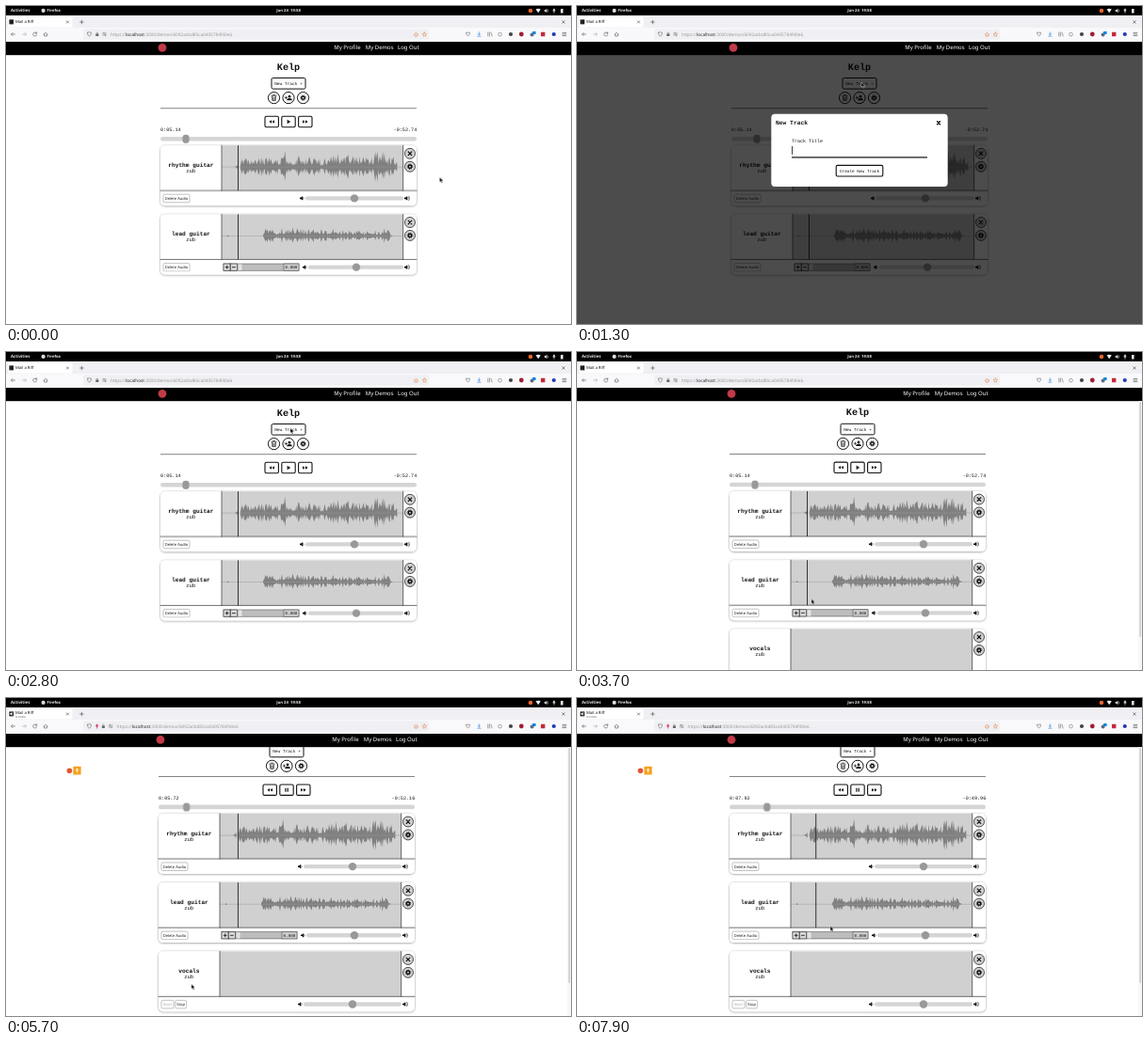
Animation, 600 px wide and 338 px high, one loop 8000 ms. Source, as an HTML page:

```html
<!DOCTYPE html>
<html lang="en">
<head>
<meta charset="utf-8">
<title>Demo page</title>
<style>
html, body { margin: 0; width: 100%; height: 100%; overflow: hidden; background: #fff; }
svg { display: block; width: 100%; height: 100%; }
text { font-family: "Noto Sans", "Open Sans", sans-serif; white-space: pre; text-rendering: geometricPrecision; }
.mono { font-family: "Liberation Mono", "DejaVu Sans Mono", monospace; }
.bold { font-weight: 700; }
.mid { text-anchor: middle; }
.end { text-anchor: end; }
.line { fill: none; stroke: #111; stroke-linecap: round; stroke-linejoin: round; }

.modal, .shift, .added, .idle, .playing, .tab-idle, .capture, .start, .stop, .url {
  animation: 8s step-end infinite;
}
.modal { animation-name: modal; }
.shift { animation-name: shift; }
.added { animation-name: added; }
.idle { animation-name: idle; }
.playing { animation-name: playing; }
.tab-idle { animation-name: tab-idle; }
.capture { animation-name: capture; }
.start { animation-name: start; }
.stop { animation-name: stop; }
.url { animation-name: url; }
.scroll { animation: scroll 8s ease-out infinite; }
.playhead { animation: playhead 8s linear infinite; }
.seek { animation: seek 8s linear infinite; }
.cursor { animation: cursor 8s linear infinite; }

@keyframes modal { 0% { opacity: 0 } 16.25% { opacity: 1 } 35%, 100% { opacity: 0 } }
@keyframes shift { 0% { transform: none } 43.75%, 100% { transform: translateX(-2px) } }
@keyframes added { 0% { opacity: 0 } 43.75%, 100% { opacity: 1 } }
@keyframes idle { 0% { opacity: 1 } 62.5%, 100% { opacity: 0 } }
@keyframes playing { 0% { opacity: 0 } 62.5%, 100% { opacity: 1 } }
@keyframes tab-idle { 0% { opacity: 1 } 65%, 100% { opacity: 0 } }
@keyframes capture { 0% { opacity: 0 } 65%, 100% { opacity: 1 } }
@keyframes start { 0% { fill: #222 } 62.5%, 100% { fill: #aaa } }
@keyframes stop { 0% { fill: #aaa } 62.5%, 100% { fill: #222 } }
@keyframes url { 0% { transform: none } 65%, 100% { transform: translateX(6.5px) } }
@keyframes scroll { 0%, 46.25% { transform: none } 48.75%, 100% { transform: translateY(-25.3px) } }
@keyframes playhead { 0%, 64% { transform: none } 100% { transform: translateX(9.55px) } }
@keyframes seek { 0%, 64% { transform: none } 100% { transform: translateX(13.2px) } }
@keyframes cursor {
  0%, 1.25% { transform: translate(460.5px, 182px); animation-timing-function: ease-in-out }
  10%, 38.75% { transform: translate(302px, 81px) }
  41.25%, 42.5% { transform: translate(283.5px, 195px) }
  46.25%, 51.25% { transform: translate(249px, 262.5px) }
  55% { transform: translate(180px, 341px) }
  56.25% { transform: translate(170px, 341px) }
  57.5% { transform: translate(168px, 334px) }
  60%, 66.25% { transform: translate(172px, 328.5px) }
  72.5% { transform: translate(203px, 298px) }
  81.25% { transform: translate(220px, 279.5px) }
  83.75% { transform: translate(228px, 259px) }
  95%, 100% { transform: translate(269px, 242.5px) }
}
</style>
</head>
<body>
<svg id="stage" viewBox="0 0 600 338">
  <defs>
    <filter id="soft" x="-5%" y="-10%" width="110%" height="120%">
      <feDropShadow dx="0" dy="0.5" stdDeviation="1.2" flood-opacity=".45"/>
    </filter>
  </defs>
</svg>
<script>
const LOOP = 8000, DURATION = 57.885, CARD_STEP = 73.2;
const stage = document.getElementById('stage');

const text = (x, y, size, str, cls = '', fill = '#111') =>
  `<text x="${x}" y="${y}" font-size="${size}" class="${cls}" fill="${fill}">${str}</text>`;
const rect = (x, y, w, h, fill, r = 0, extra = '') =>
  `<rect x="${x}" y="${y}" width="${w}" height="${h}" rx="${r}" fill="${fill}" ${extra}/>`;
const circle = (x, y, r, fill, extra = '') =>
  `<circle cx="${x}" cy="${y}" r="${r}" fill="${fill}" ${extra}/>`;
const path = (d, fill = '#111') => `<path d="${d}" fill="${fill}"/>`;
const line = (d, w = 0.8, color = '#111') =>
  `<path d="${d}" class="line" style="stroke:${color};stroke-width:${w}"/>`;
const group = (cls, ...parts) => `<g class="${cls}">${parts.join('')}</g>`;
const at = (x, y, ...parts) => `<g transform="translate(${x} ${y})">${parts.join('')}</g>`;
const outlined = (x, y, w, h, color = '#111', width = 1) =>
  rect(x, y, w, h, '#fff', 1.5, `stroke="${color}" stroke-width="${width}"`);

const cross = (x, y, s, w = 1.2, color) =>
  line(`M${x - s} ${y - s}l${2 * s} ${2 * s}m0 ${-2 * s}l${-2 * s} ${2 * s}`, w, color);
const gear = (x, y) =>
  circle(x, y, 1.7, 'none', 'stroke="#111" stroke-width="1.5"') +
  circle(x, y, 2.7, 'none', 'stroke="#111" stroke-width=".9" stroke-dasharray="1.06 1.06"');
const speaker = (x, y, loud) =>
  path(`M${x - 2} ${y - .8}h1.3l1.8 -1.6v4.8l-1.8 -1.6h-1.3z`) +
  line(`M${x + 1.8} ${y - 1}q.8 1 0 2` + (loud ? `m1 -3.2q1.8 2.2 0 4.4` : ''), 0.6);

function random(seed) {
  return () => (seed = (seed * 16807) % 2147483647) / 2147483647;
}

// Mirrored waveform: a spiky envelope given by a few [x, amplitude] points.
function wave(envelope, seed) {
  const rnd = random(seed), top = [], bottom = [];
  let k = 0;
  for (let x = envelope[0][0]; x < envelope.at(-1)[0]; x += 0.8) {
    while (envelope[k + 1][0] <= x) k++;
    const [x0, a0] = envelope[k], [x1, a1] = envelope[k + 1];
    const amp = a0 + (a1 - a0) * (x - x0) / (x1 - x0);
    const height = amp * (0.2 + 0.8 * rnd() ** 1.6);
    top.push(`${x.toFixed(2)} ${(-height).toFixed(2)}`);
    bottom.unshift(`${x.toFixed(2)} ${(height * (0.7 + 0.3 * rnd())).toFixed(2)}`);
  }
  return path(`M${top.join('L')}L${bottom.join('L')}Z`, '#808080') + rect(0, -.25, 192, .5, '#999');
}

const rhythm = [[20, 8], [24, 12], [32, 9], [44, 11], [56, 10], [64, 14], [67, 18], [70, 10], [84, 12],
  [100, 11], [108, 9], [116, 16], [122, 16], [128, 10], [134, 17], [140, 11], [148, 14], [156, 10],
  [162, 14], [168, 23], [174, 20], [177, 10], [183, 14], [187, 5]];
const lead = [[44, 7], [48, 9], [60, 7], [64, 10], [68, 7], [76, 9], [95, 7], [108, 8], [125, 8],
  [133, 6], [140, 4], [145, 7], [152, 4], [160, 8], [165, 5], [174, 9], [180, 3], [182, 1]];

const volume = (left, thumb) =>
  speaker(left - 4, 56.2, false) + rect(left, 54, 422 - left, 4.4, '#d5d5d5', 2.2) +
  circle(thumb, 56.2, 4.2, '#999') + speaker(425, 56.2, true);
const smallButton = (x, w, label, cls = '') =>
  outlined(x, 52, w, 8.6, '#999', .6) + text(x + w / 2, 57.8, 4.1, label, 'mid ' + cls, '#222');

function card(index, title, { shape = '', left = 318, thumb = 370, footer }) {
  const roundButton = (y, icon) =>
    circle(429, y, 5.5, '#d3d3d3', 'stroke="#222" stroke-width=".8"') + icon;
  return at(0, 148.2 + index * CARD_STEP,
    rect(164, 0, 272, 64, '#fff', 5, 'filter="url(#soft)"'),
    rect(229, 0, 193, 48, '#d0d0d0'),
    shape && at(229, 23, shape),
    line('M229 0v48M421.7 0v48M164 48h272', .7, '#333'),
    shape && group('playhead', rect(246, 0, .9, 48, '#222')),
    text(196.4, 23, 6.2, title, 'mono bold mid'),
    text(196.2, 28.7, 5.6, 'zub', 'mono mid'),
    roundButton(8.6, cross(429, 8.6, 1.8)),
    roundButton(22.5, gear(429, 22.5)),
    footer, volume(left, thumb));
}

const nudge =
  rect(231, 52.6, 80, 7.2, '#bdbdbd', 0, 'stroke="#555" stroke-width=".6"') +
  rect(231, 52.6, 14.6, 7.2, '#d8d8d8', 0, 'stroke="#333" stroke-width=".6"') +
  line('M238.2 52.6v7.2M233.2 56.2h3M234.7 54.7v3M240.4 56.2h3', .8) +
  rect(247, 53, 3.5, 6.4, '#e4e4e4') + rect(295, 52.6, 16, 7.2, '#ccc', 0, 'stroke="#555" stroke-width=".6"') +
  text(303, 57.8, 4.3, '0.000', 'mono mid');

const roundTool = (x, icon) =>
  circle(x, 97.6, 6.1, '#fff', 'stroke="#111" stroke-width="1"') + icon;
const transport = (x, ...icons) => outlined(x - 7.2, 117.3, 14.4, 11.4, '#111', 1.1) + icons.join('');

const content = group('shift', group('scroll',
  text(300, 67.5, 10.2, 'Kelp', 'mono bold mid'),
  outlined(282, 76.5, 36, 11.6),
  text(300, 83.8, 4.5, 'New Track +', 'mono mid'),
  roundTool(284.5, line('M282 95.3h5M283.6 94.4h1.8M282.5 96.2l.3 4.4h3.4l.3 -4.4M283.8 97v2.6M285.2 97v2.6', .7)),
  roundTool(300, circle(301, 96.2, 1.4, '#111') + path('M298.2 100.2q0 -2.2 2.8 -2.2t2.8 2.2z') +
    line('M296.2 97.4h2.4M297.4 96.2v2.4', .7)),
  roundTool(315.5, gear(315.5, 97.6)),
  rect(164, 108.3, 272, .9, '#777'),
  transport(282.2, path('M282 121.2v3.6l-2.6 -1.8zM285 121.2v3.6l-2.6 -1.8z')),
  transport(300, group('idle', path('M298.6 120.8v4.4l3.6 -2.2z')),
    group('playing', rect(298.3, 121, 1.2, 4, '#111'), rect(300.6, 121, 1.2, 4, '#111'))),
  transport(317.8, path('M315 121.2v3.6l2.6 -1.8zM318 121.2v3.6l2.6 -1.8z')),
  '<text id="elapsed" class="mono" x="164" y="133.4" font-size="5.15" fill="#111"></text>',
  '<text id="remaining" class="mono end" x="436.3" y="133.4" font-size="5.15" fill="#111"></text>',
  rect(164, 138.9, 272, 4.6, '#d5d5d5', 2.3),
  group('seek', rect(187.4, 136.8, 7.2, 9, '#999', 3.4)),
  card(0, 'rhythm guitar', {
    shape: wave(rhythm, 4711) + path('M14 -.6l2.6 -.6.5 -2 .6 2v2.4l-.6 2-.5-2z', '#808080'),
    footer: smallButton(167, 28, 'Delete Audio') }),
  card(1, 'lead guitar', {
    shape: wave(lead, 977) + rect(6, -.8, 1.2, 1.6, '#808080'), left: 321, thumb: 372,
    footer: smallButton(167, 28, 'Delete Audio') + nudge }),
  group('added', card(2, 'vocals', {
    footer: smallButton(167, 13, 'Start', 'start') + smallButton(181.8, 11.8, 'Stop', 'stop') }))
));

const modal = group('modal',
  rect(0, 52, 600, 286, 'rgba(0,0,0,.7)'),
  rect(206.3, 114.8, 187.4, 77.2, '#fff', 4),
  text(211, 126.4, 6.3, 'New Track', 'mono bold'),
  cross(384, 124.2, 1.4, 1.5),
  text(228, 144.5, 5, 'Track Title', 'mono'),
  '<text id="typed" x="228" y="155.4" font-size="6" fill="#222"></text>',
  '<rect id="caret" y="149" width=".8" height="8.8" fill="#111"/>',
  rect(228, 160.3, 144, 1.2, '#111'),
  outlined(275.2, 169.4, 49.6, 11.6, '#111', 1.1),
  text(300, 176.7, 4.4, 'Create New Track', 'mono mid'));

const nav = rect(0, 38, 600, 14.2, '#000') + group('shift',
  circle(166, 44.3, 4.4, '#c23a48'),
  text(348.3, 46.4, 6, 'My Profile', '', '#fff'),
  text(381.7, 46.4, 6, 'My Demos', '', '#fff'),
  text(416, 46.4, 6, 'Log Out', '', '#fff'));

const mic = (x, y, color) =>
  rect(x - .8, y - 2.2, 1.6, 3, color, .8) + line(`M${x - 1.6} ${y}q1.6 2.6 3.2 0M${x} ${y + 1.3}v1`, .5, color);

const topBar = rect(0, 0, 600, 10, '#000') +
  text(5, 6.4, 4.4, 'Activities', 'bold', '#eee') +
  circle(39.6, 4.9, 2.1, '#ddd') + text(43.6, 6.4, 4.2, 'Firefox', 'bold', '#eee') +
  text(300, 6.4, 4.2, 'Jun 24  19:58', 'mid bold', '#eee') +
  circle(557, 5, 2.3, '#e8642c') +
  path('M562.6 3.6q2.6 -1.8 5.2 0l-2.6 3.6z', '#eee') +
  path('M571.6 4.2h1.2l1.5 -1.4v4.4l-1.5 -1.4h-1.2z', '#eee') + line('M575.4 3.8q.8 1.2 0 2.4', .5, '#eee') +
  mic(582, 5, '#eee') + rect(589, 3, 2.6, 4.6, '#eee', .4);

const tabs = rect(0, 10, 600, 13.6, '#f0f0f4') + rect(2, 11.4, 68.5, 11, '#fff', 1.4) +
  group('tab-idle', rect(3.4, 14.4, 4.6, 5, '#222'), text(10, 18.4, 4.2, 'Mail a Riff')) +
  group('capture', rect(3.4, 14.4, 4.6, 5, '#222'), path('M4.2 16.3h1l1.4 -1.2v3.6l-1.4 -1.2h-1z', '#fff'),
    text(10, 17, 4.2, 'Mail a Riff'), text(10, 21, 2.6, 'PLAYING', '', '#555')) +
  cross(65.4, 17, 1.1, .6, '#444') + line('M78.6 17h3.6M80.4 15.2v3.6', .6, '#444') + cross(592, 17, 1.3, .6, '#444');

const toolIcon = (x, color) => outlined(x - 1.7, 28.3, 3.4, 3.6, color, .6);
const toolbar = rect(0, 23, 600, 15, '#f9f9fb') + rect(82, 24.6, 367, 10.8, '#f0f0f4', 1.4) +
  line('M9.5 30h-4m1.6 -1.6l-1.6 1.6l1.6 1.6', .6, '#555') + line('M17.5 30h4m-1.6 -1.6l1.6 1.6l-1.6 1.6', .6, '#aaa') +
  line('M32.4 28.9a2 2 0 1 0 .2 1.8M32.7 27.8v1.3h-1.3', .6, '#555') +
  line('M40 30.2l2 -2l2 2M40.6 30v2h2.8v-2', .6, '#555') +
  line('M86.5 28.3l2 -.6l2 .6q0 3 -2 4q-2 -1 -2 -4', .6, '#666') +
  group('capture', mic(96.6, 30, '#d7264c')) +
  group('url', rect(95.2, 29.6, 3.2, 2.4, '#666', .4), line('M96 29.4v-.8q.8 -1.2 1.6 0v.8', .5, '#666'),
    line('M102.6 29h4M102.6 31h4M104 28.2v1.6M105.4 30.2v1.6', .5, '#666'),
    `<text x="111" y="31.8" font-size="4.7" fill="#999">https://<tspan fill="#222">localhost</tspan>:3000/demos/6092acbd85ca0405784f40e6</text>`) +
  line('M433.4 30.2l2 -2l2 2M434 30v2h2.8v-2', .6, '#e07a3c') +
  line('M444.4 27.8l.7 1.5l1.6 .2l-1.2 1.1l.3 1.6l-1.4 -.8l-1.4 .8l.3 -1.6l-1.2 -1.1l1.6 -.2z', .5, '#e07a3c') +
  line('M488.8 28.2h3.6v1.6q-1.8 4 -3.6 0z', .6, '#666') +
  line('M502.4 27.8v3m-1.3 -1.2l1.3 1.2l1.3 -1.2M500.6 32.2h3.6', .6, '#3182dc') +
  line('M511.8 28v4M513.4 28v4M515 28.2l1.2 3.8', .6, '#666') +
  toolIcon(524.5, '#666') + circle(536, 30, 2.1, '#444') + circle(547.3, 30, 2.4, '#a01e2f') +
  circle(558.6, 30.4, 2, '#5b6b85') + rect(559, 27, 3.6, 3, '#1684e0', .5) +
  rect(568, 27.8, 4.4, 4.4, '#c8283c', .5) + circle(581.8, 30, 2.1, '#2438b0') +
  line('M591 28.4h3.8M591 30h3.8M591 31.6h3.8', .6, '#444');

const scrollbar = group('added', rect(596.2, 52.2, 3.8, 286, '#f7f7f7'), rect(597.4, 53, 1.5, 250, '#c9c9c9', .7));
const indicator = group('capture', rect(63.6, 72.6, 16, 9, '#fff', 1),
  circle(67.4, 77.3, 2.8, '#e5542f'), rect(71.4, 72.8, 8.2, 8.8, '#f5a11d', .4), mic(75.5, 77, '#fff'));
const cursor = group('cursor',
  '<path d="M0 0v5.2l1.2 -1l.9 2l1 -.4l-.9 -2h1.6z" fill="#000" stroke="#fff" stroke-width=".4"/>');

stage.innerHTML += content + modal + nav + topBar + tabs + toolbar + scrollbar + indicator + cursor;

const byId = id => document.getElementById(id);
const [elapsed, remaining, typed, caret] = ['elapsed', 'remaining', 'typed', 'caret'].map(byId);
const clock = s => '0:' + s.toFixed(2).padStart(5, '0');

let origin = null, shownTick = -1;
function render(now) {
  origin ??= now;
  const tick = Math.floor(((now - origin) % LOOP) / 100);
  if (tick !== shownTick) {
    shownTick = tick;
    const position = Math.max(5.14, tick / 10 + 0.02);
    elapsed.textContent = clock(position);
    remaining.textContent = '-' + clock(DURATION - position);
    typed.textContent = 'vocals'.slice(0, Math.max(0, tick - 20));
    caret.setAttribute('x', 228.2 + typed.getComputedTextLength());
  }
  requestAnimationFrame(render);
}
requestAnimationFrame(render);
</script>
</body>
</html>
```
